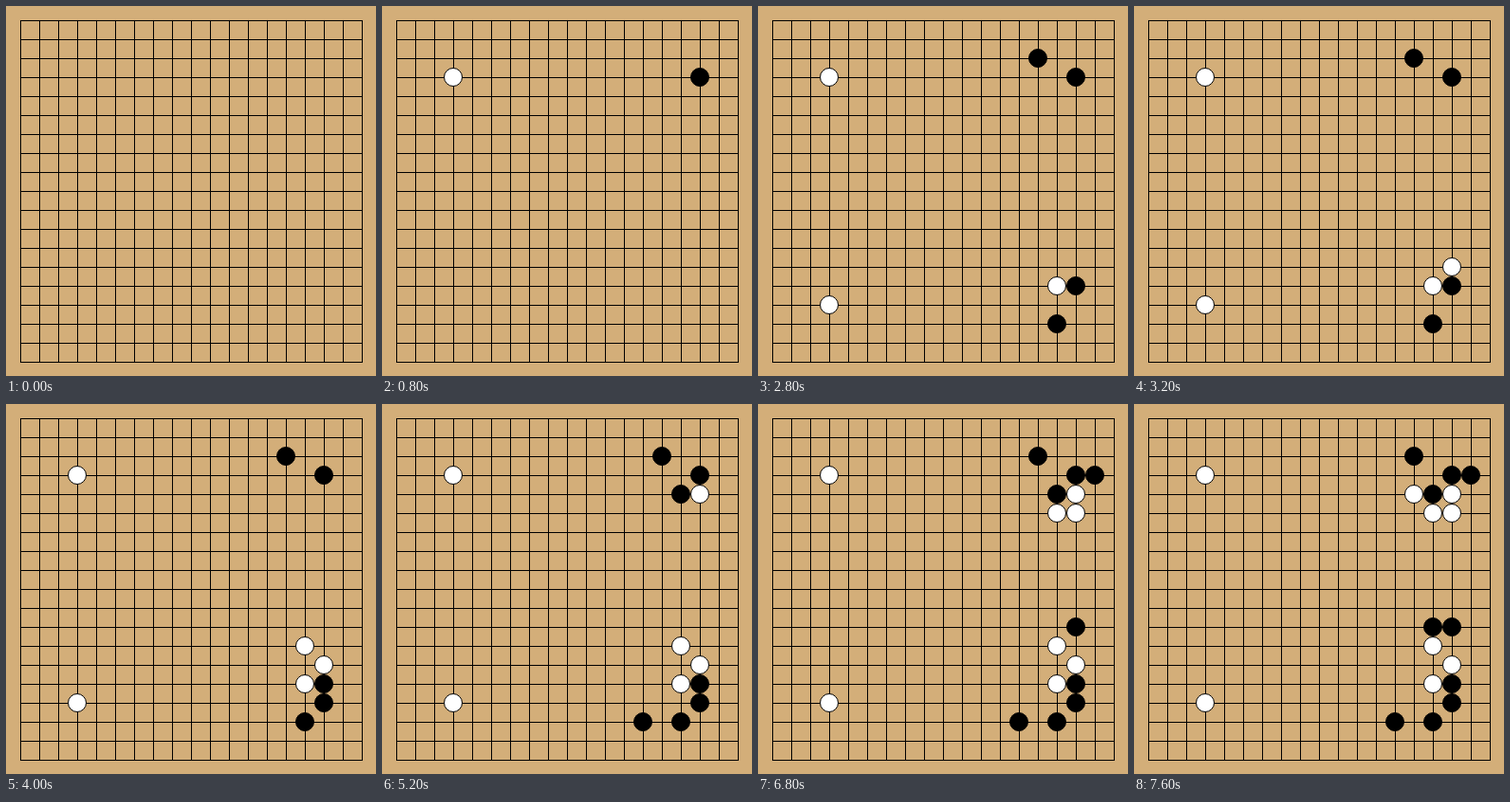
An HTML page with a canvas for the animation above (8000 ms loop, 390 by 390 pixels).

```html
<!DOCTYPE html>
<html>
<head>
<meta charset="utf-8">
<style>
html, body { margin: 0; width: 100%; height: 100%; overflow: hidden; background: #d3ae79; }
canvas { display: block; }
</style>
</head>
<body>
<canvas width="390" height="390"></canvas>
<script>
const ctx = document.querySelector('canvas').getContext('2d');
const LOOP = 8000, STEP = 400, CELL = 20, EDGE = 15, LINES = 19;

// One move per step, as column and row letters; black plays first.
const moves = 'qd dd pq dp oc po qo qn qp pm nq qe pe qf rd pf ql oe pl'.split(' ');
const place = letter => EDGE + CELL * (letter.charCodeAt(0) - 97);

function drawBoard() {
  ctx.fillStyle = '#d3ae79';
  ctx.fillRect(0, 0, 390, 390);
  ctx.fillStyle = '#000';
  const size = CELL * (LINES - 1) + 1;
  for (let i = 0; i < LINES; i++) {
    const p = EDGE + i * CELL;
    ctx.fillRect(p, EDGE, 1, size);
    ctx.fillRect(EDGE, p, size, 1);
  }
}

function drawStone([col, row], i) {
  ctx.beginPath();
  ctx.arc(place(col), place(row), 9.5, 0, 2 * Math.PI);
  ctx.fillStyle = i % 2 ? '#fff' : '#000';
  ctx.fill();
  ctx.strokeStyle = '#000';
  ctx.stroke();
}

let shown = -1;
function frame() {
  const count = Math.floor(performance.now() % LOOP / STEP);
  if (count !== shown) {
    shown = count;
    drawBoard();
    moves.slice(0, count).forEach(drawStone);
  }
  requestAnimationFrame(frame);
}
frame();
</script>
</body>
</html>
```
